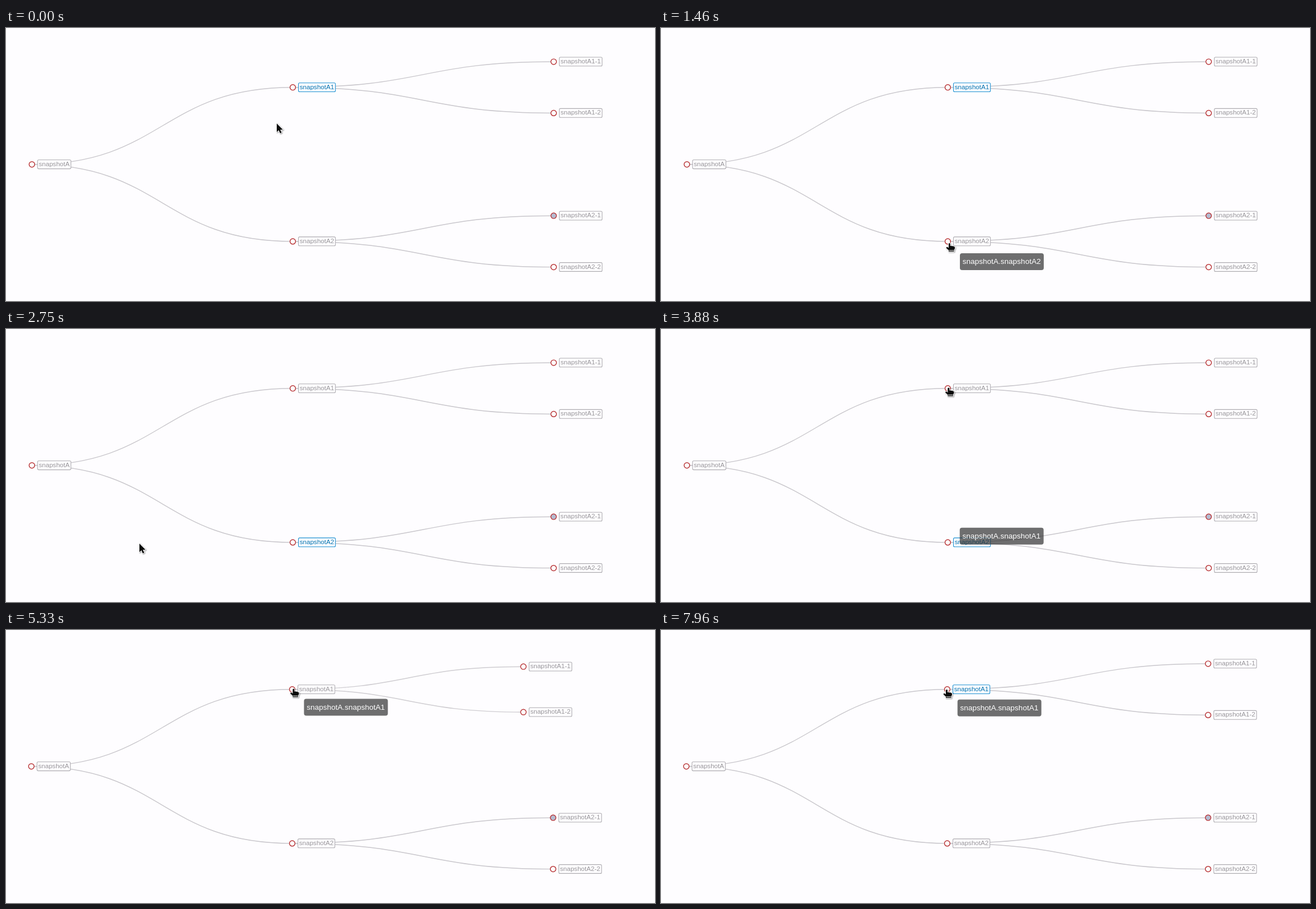
Animation, 1153 px wide and 486 px high, one loop 8 s. Source, as an HTML page with a canvas:

```html
<!DOCTYPE html>
<html lang="en">
<head>
<meta charset="utf-8">
<title>Snapshot tree</title>
<style>
  html, body { margin: 0; width: 100%; height: 100%; overflow: hidden; background: #fefdff; }
  canvas { display: block; }
</style>
</head>
<body>
<canvas id="stage" width="1153" height="486"></canvas>
<script>
const ctx = document.getElementById('stage').getContext('2d');
const LOOP = 8000, PAPER = '#fefdff', FONT = '"Liberation Sans", Arial, sans-serif';

// Binary tree: columns 463.5 px apart, leaves spread evenly around their parent
const MIDDLE = 242.8, COLUMN = 463.5, GAP = 45.7;
const root = { name: 'snapshotA', x: 46, y: MIDDLE };
const children = (parent, spread, suffix) => [1, 2].map(k => ({
  name: parent.name + suffix + k,
  x: parent.x + COLUMN,
  y: parent.y + (k === 1 ? -spread : spread)
}));
const branches = children(root, 3 * GAP, '');
const leaves = branches.map(b => children(b, GAP, '-'));
leaves[1][0].filled = true;

// A click rebuilds a branch; the animation halts while the page is busy
const REBUILD = 750;
const rebuilds = [
  { start: 4480, halt: 4880, resume: 5210 },
  { start: 1680, halt: 2210, resume: 2560 }
];

// Hovered nodes: pointer tip, time the tooltip starts to glide, time the pointer leaves
const hovers = [
  { x: 511, y: 381, glide: 1019, leave: 1710, text: 'snapshotA.snapshotA2' },
  { x: 509.4, y: 102.4, glide: 3865, leave: 6035, text: 'snapshotA.snapshotA1' },
  { x: 506, y: 104, glide: 7860, leave: LOOP, text: 'snapshotA.snapshotA1' }
];
hovers.forEach(h => h.show = h.glide - 75);

const start = { x: 481, y: 170 };
const moves = [
  { from: 380, to: 860, x: 505, y: 408 },
  { from: 860, to: hovers[0].show, ...spot(hovers[0]) },
  { from: 1690, to: 1990, x: 237, y: 382 },
  { from: 3030, to: hovers[1].show, ...spot(hovers[1]) },
  { from: 6020, to: 6200, x: 521, y: 251 },
  { from: 6480, to: 6880, x: 504, y: 150 },
  { from: 6880, to: 7290, x: 531, y: 49 },
  { from: 7610, to: hovers[2].show, ...spot(hovers[2]) }
];

function spot({ x, y }) { return { x, y }; }
const clamp = p => Math.min(1, Math.max(0, p));
const mix = (a, b, p) => a + (b - a) * p;
const between = (a, b, p) => ({ x: mix(a.x, b.x, p), y: mix(a.y, b.y, p) });
const cubicOut = p => 1 - (1 - p) ** 3;
const cubicInOut = p => p < .5 ? 4 * p ** 3 : 1 - 4 * (1 - p) ** 3;

// cubic-bezier(.23, 1, .32, 1)
function glideEase(p) {
  let lo = 0, hi = 1;
  for (let i = 0; i < 20; i++) {
    const s = (lo + hi) / 2, r = 1 - s;
    if (.69 * r * r * s + .96 * r * s * s + s ** 3 < p) lo = s; else hi = s;
  }
  return cubicOut(lo);
}

function link(a, b, alpha = 1) {
  const mid = (a.x + b.x) / 2;
  ctx.globalAlpha = alpha;
  ctx.strokeStyle = '#c9c7cc';
  ctx.lineWidth = 1.45;
  ctx.beginPath();
  ctx.moveTo(a.x, a.y);
  ctx.bezierCurveTo(mid, a.y, mid, b.y, b.x, b.y);
  ctx.stroke();
  ctx.globalAlpha = 1;
}

function node(n, { strength = 1, active = false } = {}) {
  ctx.globalAlpha = strength;
  ctx.beginPath();
  ctx.arc(n.x, n.y, 4.9 * strength, 0, 7);
  ctx.fillStyle = n.filled ? '#b4bbd0' : '#fff';
  ctx.fill();
  ctx.strokeStyle = '#b93639';
  ctx.lineWidth = 1.45;
  ctx.stroke();

  ctx.font = `11.6px ${FONT}`;
  ctx.beginPath();
  ctx.roundRect(n.x + 10.1, n.y - 8, ctx.measureText(n.name).width + 4.4, 15.8, 2);
  ctx.fillStyle = PAPER;
  ctx.fill();
  ctx.strokeStyle = active ? '#1a8fd1' : '#adabb0';
  ctx.lineWidth = 1.1;
  ctx.stroke();
  ctx.fillStyle = active ? '#0072b0' : '#98969a';
  ctx.fillText(n.name, n.x + 12.2, n.y + 3);
  ctx.globalAlpha = 1;
}

function tree(t) {
  const active = [t < 2210 || t >= hovers[2].glide, t >= 2210 && t < 4880];
  const leaving = [];
  ctx.save();
  if (t >= rebuilds[0].start) ctx.translate(-1, 0);

  branches.forEach((b, i) => {
    link(root, b);
    const { start, halt, resume } = rebuilds[i];
    const elapsed = Math.min(t, halt) + Math.max(0, t - resume) - start;
    const p = elapsed < 0 ? 1 : clamp(elapsed / REBUILD);
    const grown = cubicInOut(p), gone = cubicOut(p);
    for (const leaf of leaves[i]) {
      const fresh = { ...leaf, ...between(b, leaf, grown) };
      link(b, fresh, grown);
      node(fresh);
      if (p < 1) {
        const old = { ...leaf, ...between(leaf, b, gone) };
        link(b, old, 1 - gone);
        leaving.push([old, 1 - gone]);
      }
    }
  });
  node(root);
  branches.forEach((b, i) => node(b, { active: active[i] }));
  leaving.forEach(([n, strength]) => node(n, { strength }));
  ctx.restore();
}

// Each tooltip glides from where the last one was to just beside the pointer
function tooltips(t) {
  let last = { x: 541, y: 209 };
  for (const h of hovers) {
    if (t >= h.show && t < h.leave + 115) {
      const { x, y } = between(last, h, glideEase(clamp((t - h.glide) / 400)));
      ctx.fillStyle = 'rgba(50, 50, 50, .7)';
      ctx.beginPath();
      ctx.roundRect(x + 20, y + 20, 149, 30, 4);
      ctx.fill();
      ctx.fillStyle = '#fff';
      ctx.font = `13.5px ${FONT}`;
      ctx.fillText(h.text, x + 24.8, y + 39.4);
    }
    last = h;
  }
}

const arrow = new Path2D('M0 0V15.2L3.5 12L6 17.4L8.6 16.2L6.2 11H10.9Z');
const hand = new Path2D('M0 3Q1.5 1.2 3 3V7L5 6.5L6 7.5L8 7L9 8L11 8.5V12L9.5 14V17H0V14.5L-4 11V9L-2 9L0 10.5Z');

function pointer(t) {
  const { x, y } = moves.reduce((at, m) => between(at, m, clamp((t - m.from) / (m.to - m.from))), start);
  const isHand = hovers.some(h => t >= h.show && t < h.leave);
  const shape = isHand ? hand : arrow;
  ctx.save();
  ctx.translate(x, y);
  ctx.lineJoin = 'round';
  ctx.shadowColor = 'rgba(0, 0, 0, .4)';
  ctx.shadowBlur = 2;
  ctx.shadowOffsetX = ctx.shadowOffsetY = 1;
  ctx.strokeStyle = '#fff';
  ctx.lineWidth = 2;
  ctx.stroke(shape);
  ctx.shadowColor = 'transparent';
  ctx.fillStyle = '#0c0c0c';
  ctx.fill(shape);
  if (isHand) {
    ctx.fillStyle = '#fff';
    ctx.fillRect(.5, 14.5, 8.5, 1);
  }
  ctx.restore();
}

function draw() {
  const t = performance.now() % LOOP;
  ctx.fillStyle = PAPER;
  ctx.fillRect(0, 0, 1153, 486);
  tree(t);
  tooltips(t);
  pointer(t);
  requestAnimationFrame(draw);
}
draw();
</script>
</body>
</html>
```
